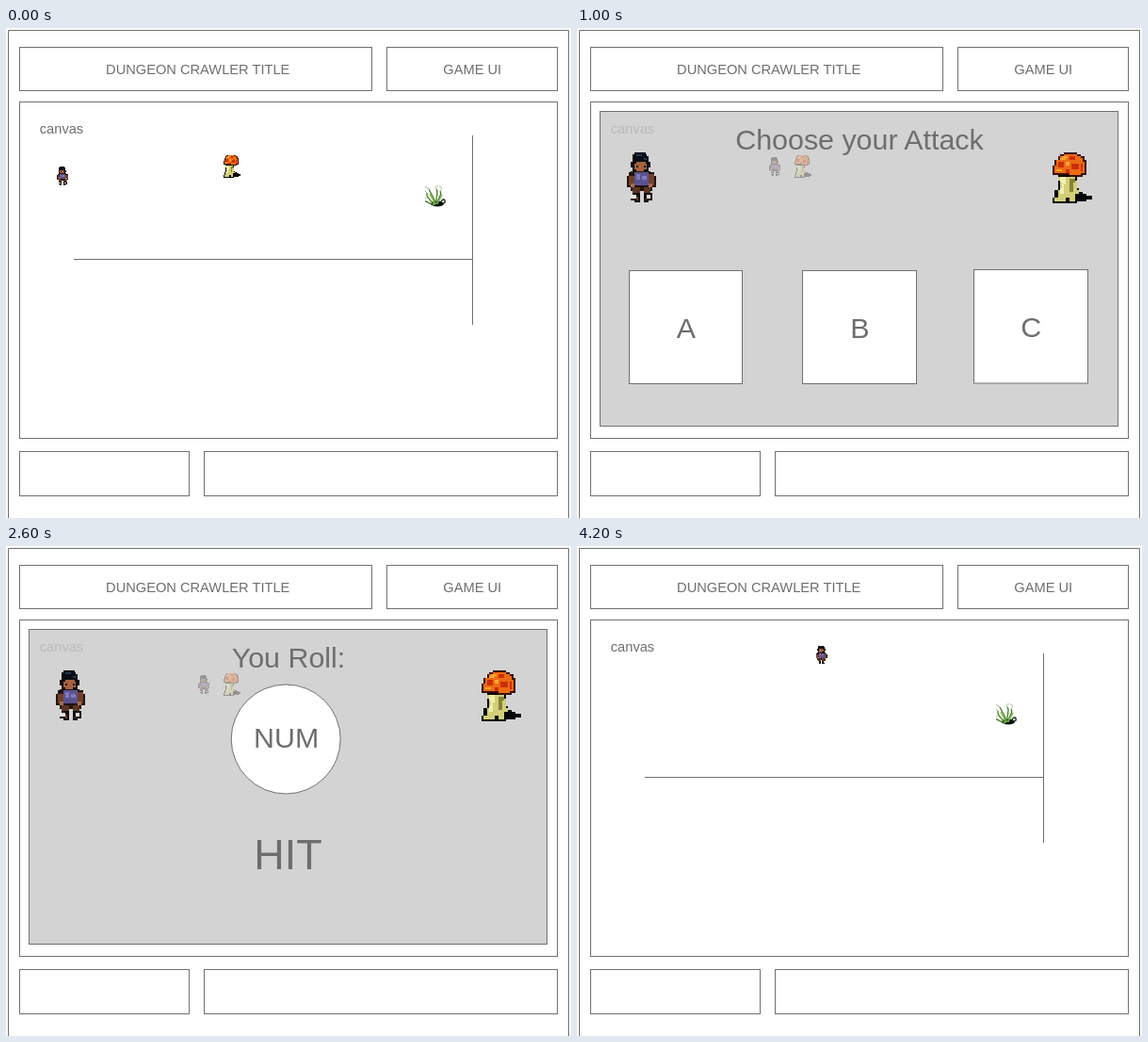
An HTML page for the animation above (5 s loop, 600 by 520 pixels).

```html
<!DOCTYPE html>
<html lang="en">
<head>
<meta charset="utf-8">
<title>Dungeon crawler wireframe</title>
<style>
  html, body { margin: 0; width: 100%; height: 100%; overflow: hidden; background: #fff; }
  svg { display: block; width: 600px; height: 520px; }
  text { font-family: "Liberation Sans", Arial, sans-serif; font-size: 14.65px; fill: #6e6e6e; }
  .mid { text-anchor: middle; }
  .big { font-size: 30.4px; }
  .box { fill: #fff; stroke: #707070; stroke-width: 1; }
  .line { fill: none; stroke: #707070; stroke-width: 1; }
  .pixel { shape-rendering: crispEdges; }
</style>
</head>
<body>
<svg viewBox="0 0 600 520" xmlns="http://www.w3.org/2000/svg">
  <defs>
    <!-- 16 x 27 units -->
    <g id="hero">
      <path fill="#25130f" d="M2 10h11v1h2v2h1v6h-2v2h-12v-2h-2v-6h1v-2h1z"/>
      <path fill="#0b0c14" d="M3 1h1v-1h6v1h1v1h1v3h1v3h-1v2h-9v-2h-1v-3h1z"/>
      <path fill="#1b3a4e" d="M5 1h3v1h-3zM9 3h2v1h-2z"/>
      <path fill="#a5623f" d="M4 6h1v-1h5v1h1v3h-2v1h-4v-1h-1z"/>
      <path fill="#1a0d0a" d="M5 7h1v1h-1zM9 7h1v1h-1z"/>
      <path fill="#70402a" d="M1 13h3v5h-3zM12 12h3v6h-3z"/>
      <path fill="#a96d4c" d="M2 17h2v2h-2zM12 17h2v2h-2z"/>
      <path fill="#5a5390" d="M4 11h8v7h-8z"/>
      <path fill="#8279bb" d="M5 12h2v3h-2zM8 13h3v2h-3z"/>
      <path fill="#5b3423" d="M3 19h4v4h-4zM9 19h4v4h-4z"/>
      <path fill="#120c0c" d="M3 22h4v5h-3v-1h-2v-2h1zM9 22h5v4h-2v1h-3z"/>
      <path fill="#e6dfdc" d="M2 23h3v2h-3zM11 23h2v2h-2z"/>
      <path fill="#70402a" d="M5 24h1v2h-1zM10 25h1v1h-1z"/>
    </g>

    <!-- 22 x 27 units -->
    <g id="shroom">
      <path fill="#050505" d="M13 21h4v1h2v1h3v2h-3v1h-5v1h-13v-3h1v-4h2v-8h10v7h1v2h-2z"/>
      <path fill="#d2cf78" d="M4 13h9v2h1v5h1v2h-2v4h-3v-2h-2v2h-6v-2h2v-4h1v-5h-1z"/>
      <path fill="#f0efb2" d="M5 13h3v4h-1v5h-2v-3h1v-3h-1z"/>
      <path fill="#85833b" d="M10 14h3v2h-1v5h-2z"/>
      <path fill="#3a1006" d="M7 0h7v1h2v1h2v2h1v8h-2v1h-7v-1h-9v-5h1v-3h2v-2h1v-1h2z"/>
      <path fill="#ee6a12" d="M7 1h7v1h2v1h1v2h1v6h-2v1h-6v-1h-8v-4h1v-3h2v-2h2z"/>
      <path fill="#cc2f0c" d="M10 2h3v2h-3zM4 5h3v3h-3zM11 6h4v3h-4zM8 9h2v2h-2zM16 6h1v4h-1z"/>
      <path fill="#ffa832" d="M6 2h3v1h-1v1h-3v-1h1zM8 5h2v2h-2zM3 9h3v1h-3z"/>
    </g>

    <g id="plant" fill="none" stroke-width="1.3">
      <ellipse cx="14" cy="20.5" rx="7" ry="3" fill="#080c06"/>
      <path stroke="#477f28" d="M10 22C8 15 2 16 3 9M12 20C10 13 8 11 5 5M13 20C12 12 16 9 13 5M15 19C14 13 20 12 17 7M8 21C5 20 3 18 1 18"/>
      <path stroke="#7cb84c" d="M11 21C10 16 8 14 6 10M14 21C15 16 18 15 19 11M9 22l6 -3"/>
      <path stroke="#a7b99b" stroke-width="1" d="M5 5C4 3 2 4 1 2M3 9L1 7M13 5C11 3 13 1 15 2M17 7C19 5 19 2 16 2M3 15L1 14"/>
      <path stroke="#26331f" stroke-width="1.5" d="M18 19C19 15 23 15 22 19l-3 2"/>
    </g>
  </defs>

  <rect width="600" height="520" fill="#fff"/>
  <path class="line" d="M2.5 525V2.5H597.5V525"/>
  <g id="panels"></g>
  <text class="mid" x="203.7" y="49">DUNGEON CRAWLER TITLE</text>
  <text class="mid" x="495.2" y="49">GAME UI</text>

  <g id="map">
    <text x="35.8" y="112">canvas</text>
    <path class="line" d="M72 245.5H495.5M495.5 114V315"/>
    <use id="walker" class="pixel" href="#hero"/>
    <use id="foe" class="pixel" href="#shroom" transform="translate(230 134.5) scale(.87 .9)"/>
    <use href="#plant" transform="translate(444 166)"/>
  </g>

  <g id="battle">
    <rect x="24.5" y="88.5" width="550" height="334" fill="#d3d3d3" stroke="#707070"/>
    <text x="35.8" y="112" style="fill:#bababa">canvas</text>
    <g class="pixel" opacity=".3">
      <use href="#hero" transform="translate(204 137) scale(.77 .73)"/>
      <use href="#shroom" transform="translate(230 134.5) scale(.87 .9)"/>
    </g>
    <use class="pixel" href="#hero" transform="translate(53 132) scale(1.95)"/>
    <use class="pixel" href="#shroom" transform="translate(503 132) scale(2)"/>

    <g id="choose">
      <text class="mid big" x="300" y="128.5">Choose your Attack</text>
      <g id="choices"></g>
    </g>

    <g id="roll">
      <text class="mid big" x="300" y="128.5">You Roll:</text>
      <circle class="box" cx="297.2" cy="205" r="58"/>
      <text class="mid big" x="297.6" y="214">NUM</text>
      <text class="mid" x="299.5" y="342.8" style="font-size:45px">HIT</text>
    </g>
  </g>
</svg>

<script>
  const LOOP = 5000;
  const $ = id => document.getElementById(id);

  const box = (x, y, w, h) =>
    `<rect class="box" x="${x}" y="${y}" width="${w}" height="${h}"/>`;
  const choice = (label, x, y, w, h) =>
    box(x, y, w, h) +
    `<text class="mid big" x="${x + w / 2 + 0.3}" y="${y + 71.2}">${label}</text>`;

  $("panels").innerHTML =
    box(14.5, 20.5, 374, 46) + box(404.5, 20.5, 181, 46) +
    box(14.5, 78.5, 571, 357) +
    box(14.5, 449.5, 180, 47) + box(210.5, 449.5, 375, 47);

  $("choices").innerHTML =
    choice("A", 55.5, 257.5, 120, 120) +
    choice("B", 239.5, 257.5, 121, 120) +
    choice("C", 421.5, 256.5, 121, 120.5);

  const show = (id, on) => $(id).setAttribute("display", on ? "inline" : "none");

  function draw(ms) {
    const t = ms % LOOP;
    const choosing = t >= 1000 && t < 2000;
    const rolling = t >= 2000 && t < 3000;
    const won = t >= 3000;
    show("map", !choosing && !rolling);
    show("battle", choosing || rolling);
    show("choose", choosing);
    show("roll", rolling);
    show("foe", !won);
    const [x, y] = won ? [253.5, 105.5] : [54, 147];
    $("walker").setAttribute("transform", `translate(${x} ${y}) scale(.77 .73)`);
  }

  const start = performance.now();
  function tick() {
    draw(performance.now() - start);
    requestAnimationFrame(tick);
  }
  tick();
</script>
</body>
</html>
```
